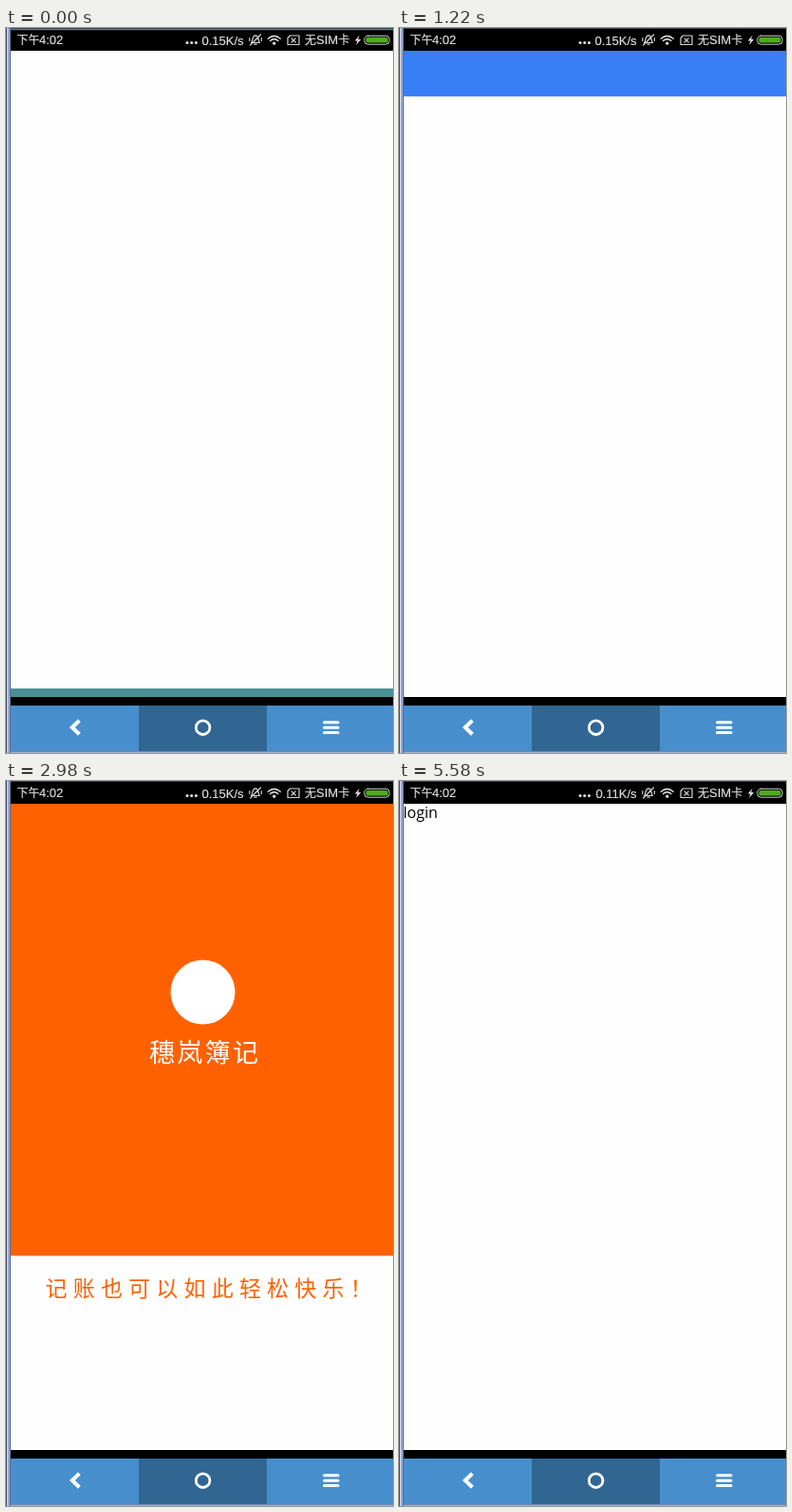
An HTML page for the animation above (6500 ms loop, 408 by 764 pixels).

```html
<!DOCTYPE html>
<html lang="zh">
<head>
<meta charset="utf-8">
<title>App launch</title>
<style>
  html, body { margin: 0; width: 100%; height: 100%; overflow: hidden; background: #fff; }
  svg { display: block; width: 408px; height: 764px; }
  text { white-space: pre; }
  .status { font: 13px "Liberation Sans", Arial, sans-serif; fill: #dcdcdc; stroke: #dcdcdc; stroke-width: .2; }
  .cjk { font: 12px "Noto Sans CJK SC", "Noto Sans CJK", sans-serif; }
  .brush { font-family: "Noto Sans CJK SC", "Noto Sans CJK", sans-serif; font-weight: 500; }
  .login { font: 16px "Open Sans", "Noto Sans", sans-serif; fill: #000; }
  .line { fill: none; stroke: #d4d4d4; stroke-width: 1.2; stroke-linecap: round; stroke-linejoin: round; }
</style>
</head>
<body>
<svg viewBox="0 0 408 764">
  <rect width="408" height="764" fill="#fefefe"/>

  <!-- window edge -->
  <rect width="1" height="764" fill="#4b5468"/>
  <rect x="1" width="1" height="764" fill="#d3dcee"/>
  <rect x="2" width="2" height="764" fill="#93a9d8"/>
  <rect x="4" width="1" height="764" fill="#5d6a88"/>

  <!-- status bar -->
  <rect x="5" width="403" height="24"/>
  <rect x="5" width="403" height="1" fill="#3c4242"/>
  <g class="status">
    <text x="11.5" y="17"><tspan class="cjk">下午</tspan><tspan x="35">4:02</tspan></text>
    <text id="speed" x="250.5" y="17.5" text-anchor="end"></text>
    <text x="315" y="17"><tspan class="cjk">无</tspan>SIM<tspan class="cjk">卡</tspan></text>
  </g>
  <g fill="#e4e4e4">
    <circle cx="191" cy="15.5" r="1.5"/>
    <circle cx="195.7" cy="15.5" r="1.5"/>
    <circle cx="200.4" cy="15.5" r="1.5"/>
    <circle cx="282.7" cy="16.2" r="1.6"/>
    <path d="M372.5 8L367.7 13.6H370.5L369 18L374.2 12H371.2Z"/>
  </g>
  <g class="line">
    <path d="M258.5 15.5C260.3 14 259.4 8 263 7.8C266.8 8 265.7 14 267.5 15.5ZM261.8 17.2H264.2M257.5 18L268.5 7M256.8 10.5V13.5M269.3 10.5V13.5"/>
    <path d="M276.2 11.2Q282.7 5.6 289.2 11.2M278.6 13.4Q282.7 9.8 286.8 13.4" stroke-width="1.5"/>
    <path d="M299.5 8H309V17.5H297V10.5ZM301 10.8L305.2 15M305.2 10.8L301 15"/>
    <rect x="377.7" y="8.2" width="26.6" height="9" rx="4" stroke-width="1"/>
  </g>
  <rect x="379.3" y="9.8" width="23.4" height="5.8" rx="2.6" fill="#4dac1c"/>

  <!-- screens -->
  <g id="starting" fill="#489094">
    <rect x="5" y="1" width="403" height="1.2"/>
    <rect x="5" y="696" width="403" height="9"/>
  </g>
  <g id="header">
    <rect x="5" y="24" width="403" height="48" fill="#387ef7"/>
    <rect x="5" y="72" width="403" height="1" fill="#e4edfd"/>
  </g>
  <g id="splash">
    <rect x="5" y="24" width="403" height="476.3" fill="#ff6100"/>
    <circle cx="207.5" cy="222.5" r="34" fill="#fff"/>
    <text class="brush" x="151" y="296" font-size="27" letter-spacing="2.3" fill="#fff">穗岚簿记</text>
    <text class="brush" x="41.5" y="543" font-size="23" letter-spacing="6.2" fill="#ff6100">记账也可以如此轻松快乐！</text>
  </g>
  <text id="login" class="login" x="4.5" y="39">login</text>

  <!-- navigation bar -->
  <rect x="5" y="705" width="403" height="9"/>
  <rect x="5" y="714" width="403" height="48" fill="#478fcc"/>
  <rect x="140" y="714" width="135" height="48" fill="#316693"/>
  <rect x="5" y="762" width="403" height="1" fill="#6f88ad"/>
  <rect x="5" y="763" width="403" height="1" fill="#a3b3cf"/>
  <g fill="none" stroke="#fff">
    <path d="M77.3 729.7L69.8 737L77.3 744.3" stroke-width="4"/>
    <circle cx="207.6" cy="737.2" r="7.3" stroke-width="2.8"/>
    <path d="M335.5 731.8H350M335.5 737.2H350M335.5 742.6H350" stroke-width="3" stroke-linecap="round"/>
  </g>
</svg>
<script>
  const LOOP = 6500;
  const spans = {
    starting: [0, 100],
    header: [800, 1500],
    splash: [1500, 4200],
    login: [4200, LOOP]
  };
  const byId = id => document.getElementById(id);
  const start = performance.now();

  function draw(t) {
    for (const [id, [from, to]] of Object.entries(spans)) {
      byId(id).style.display = t >= from && t < to ? "" : "none";
    }
    byId("speed").textContent = t < 3900 ? "0.15K/s" : "0.11K/s";
  }

  function tick() {
    draw((performance.now() - start) % LOOP);
    requestAnimationFrame(tick);
  }
  tick();
</script>
</body>
</html>
```
